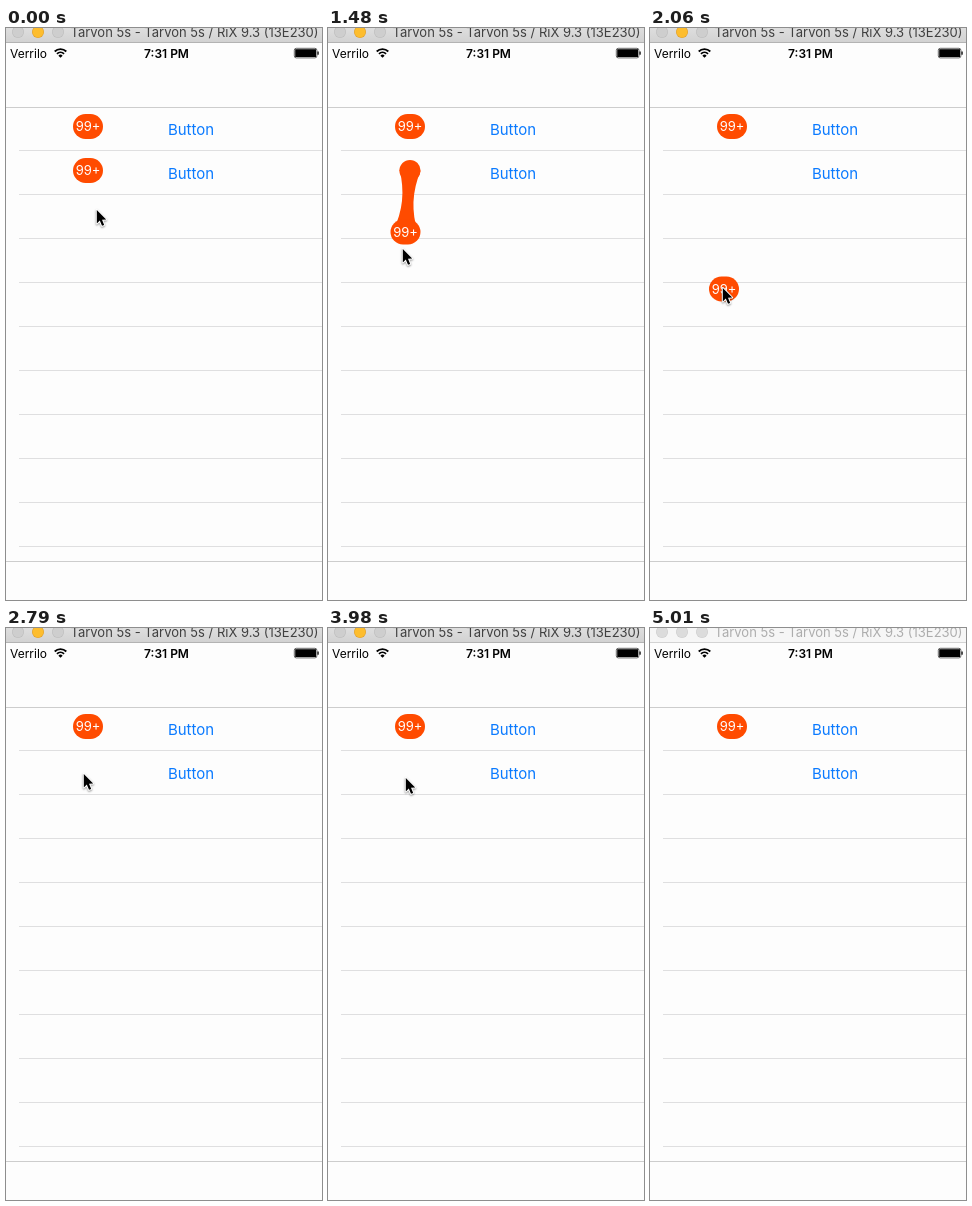
An HTML page with a canvas for the animation above (5030 ms loop, 316 by 572 pixels).

```html
<!DOCTYPE html>
<html lang="en">
<head>
<meta charset="utf-8">
<title>Draggable badge</title>
<style>
  html, body { margin: 0; width: 100%; height: 100%; overflow: hidden; background: #fdfdfd; }
  canvas { display: block; }
</style>
</head>
<body>
<canvas id="stage" width="316" height="572"></canvas>
<script>
const ctx = document.getElementById('stage').getContext('2d');
const WIDTH = 316, HEIGHT = 572, LOOP = 5030;
const STEP = 147.1;              // the pointer is sampled at this interval
const ORANGE = '#ff4b00';
const BADGE_X = 82, BADGE_R = 12.5, BREAK_DISTANCE = 90;
const ROWS = [98.5, 142.5];      // badge centres

// Pointer path: [step, x, y]
const POINTER = [
  [2, 90, 181], [3, 88, 170], [4, 84, 150], [5, 83, 145],
  [7, 79, 167], [9, 75.5, 202], [10, 74, 220], [11, 73, 235],
  [12, 72.5, 248], [13, 72, 259], [16, 72, 256], [17, 73, 230],
  [19, 77, 145], [20, 79, 112], [21, 79.5, 103], [22, 79.5, 128],
  [23, 76, 147], [24, 76, 149], [25, 77, 149], [28, 77, 149],
  [29, 119, 195], [30, 232, 400], [31, 288, 547]
];

function pointerAt(step) {
  const next = POINTER.findIndex(p => p[0] >= step);
  if (next < 0) return POINTER[POINTER.length - 1].slice(1);
  if (next === 0) return POINTER[0].slice(1);
  const a = POINTER[next - 1], b = POINTER[next];
  const k = (step - a[0]) / (b[0] - a[0]);
  return [a[1] + (b[1] - a[1]) * k, a[2] + (b[2] - a[2]) * k];
}

function rect(x, y, w, h, color) {
  ctx.fillStyle = color;
  ctx.fillRect(x, y, w, h);
}

function disc(x, y, r, color) {
  ctx.fillStyle = color;
  ctx.beginPath();
  ctx.arc(x, y, r, 0, Math.PI * 2);
  ctx.fill();
}

function text(str, x, y, font, color, align = 'center') {
  ctx.font = font + ' Inter, Roboto, sans-serif';
  ctx.fillStyle = color;
  ctx.textAlign = align;
  ctx.fillText(str, x, y);
}

function drawTitleBar(active) {
  const shade = ctx.createLinearGradient(0, 0, 0, 14);
  shade.addColorStop(0, active ? '#dedede' : '#f6f6f6');
  shade.addColorStop(1, active ? '#d2d2d2' : '#f6f6f6');
  rect(0, 0, WIDTH, 14, shade);
  rect(0, 14, WIDTH, 1, active ? '#b3b3b3' : '#d3d3d3');
  [12, 32, 52].forEach((x, i) => {
    const lit = active && i === 1;
    disc(x, 4, 6, lit ? '#e0a02d' : active ? '#bdbdbd' : '#cecece');
    disc(x, 4, 5.4, lit ? '#fdbd2e' : active ? '#cecece' : '#dcdcdc');
  });
  text('Tarvon 5s - Tarvon 5s / RiX 9.3 (13E230)', 188.5, 9, '13px',
    active ? '#404040' : '#adadad');
}

function drawStatusBar() {
  text('Verrilo', 4, 29.5, '12px', '#000', 'left');
  text('7:31 PM', 160.5, 29.5, '600 12px', '#000');

  ctx.strokeStyle = '#000';
  ctx.lineWidth = 1.8;
  for (const r of [5, 8.2]) {
    ctx.beginPath();
    ctx.arc(54.5, 29.3, r, -Math.PI * 0.75, -Math.PI * 0.25);
    ctx.stroke();
  }
  ctx.fillStyle = '#000';
  ctx.beginPath();
  ctx.moveTo(54.5, 29.8);
  ctx.arc(54.5, 29.8, 3, -Math.PI * 0.75, -Math.PI * 0.25);
  ctx.fill();

  ctx.lineWidth = 0.6;
  ctx.beginPath();
  ctx.roundRect(288.3, 20.3, 22.6, 9.6, 2);
  ctx.stroke();
  rect(289.2, 21.2, 20.8, 7.8, '#000');
  rect(311.4, 23.5, 1.3, 3.2, '#000');
}

function drawTable() {
  rect(0, 79, WIDTH, 1, '#cdcdcd');
  for (let y = 122; y <= 518; y += 44) rect(13, y, WIDTH - 13, 1, '#dfdfe0');
  rect(0, 533, WIDTH, 1, '#cdcdcd');
  for (const y of ROWS) text('Button', 185, y + 8, '15px', '#0a7aff');
}

function drawBadge(x, y) {
  ctx.fillStyle = ORANGE;
  ctx.beginPath();
  ctx.roundRect(x - 15, y - BADGE_R, 30, BADGE_R * 2, BADGE_R);
  ctx.fill();
  text('99+', x, y + 4.6, '13px', '#fff');
}

// Anchor disc and the neck that narrows towards the midpoint
function drawTether(homeY, x, y) {
  const dx = x - BADGE_X, dy = y - homeY, d = Math.hypot(dx, dy);
  if (d > BREAK_DISTANCE) return;
  const r = BADGE_R - d / 32;
  const nx = -dy / d, ny = dx / d;
  const midX = BADGE_X + dx / 2, midY = homeY + dy / 2;
  disc(BADGE_X, homeY, r, ORANGE);
  ctx.beginPath();
  ctx.moveTo(BADGE_X + nx * r, homeY + ny * r);
  ctx.quadraticCurveTo(midX, midY, x + nx * BADGE_R, y + ny * BADGE_R);
  ctx.lineTo(x - nx * BADGE_R, y - ny * BADGE_R);
  ctx.quadraticCurveTo(midX, midY, BADGE_X - nx * r, homeY - ny * r);
  ctx.fill();
}

function drawRowBadge(row, dragging, step) {
  const homeY = ROWS[row];
  if (!dragging) return drawBadge(BADGE_X, homeY);
  const [px, py] = pointerAt(step - 1);   // the badge trails the pointer
  drawTether(homeY, px + 2, py + 2);
  drawBadge(px + 2, py + 2);
}

function drawPointer(x, y) {
  ctx.save();
  ctx.translate(x + 0.8, y + 1);
  ctx.beginPath();
  [[0, 0], [0, 13.4], [3, 10.6], [5.2, 15.8], [7.4, 14.9], [5.2, 9.8], [9.4, 9.6]]
    .forEach(p => ctx.lineTo(...p));
  ctx.closePath();
  ctx.lineJoin = 'round';
  ctx.lineWidth = 2;
  ctx.strokeStyle = '#fff';
  ctx.shadowColor = 'rgba(0,0,0,0.4)';
  ctx.shadowBlur = 2;
  ctx.shadowOffsetY = 1;
  ctx.stroke();
  ctx.shadowColor = 'transparent';
  ctx.fillStyle = '#000';
  ctx.fill();
  ctx.restore();
}

function draw(now) {
  const t = now % LOOP;
  const step = Math.floor((t + 5) / STEP);
  rect(0, 0, WIDTH, HEIGHT, '#fdfdfd');
  drawTitleBar(t < 5010);
  drawStatusBar();
  drawTable();
  drawRowBadge(0, step >= 22 && step < 27, step);
  if (step < 16) drawRowBadge(1, step >= 7, step);
  if (step < 32) drawPointer(...pointerAt(step === 6 ? 5 : step === 15 ? 13 : step === 14 ? 13 : step));
}

const start = performance.now();
function tick() {
  draw(performance.now() - start);
  requestAnimationFrame(tick);
}
tick();
</script>
</body>
</html>
```
